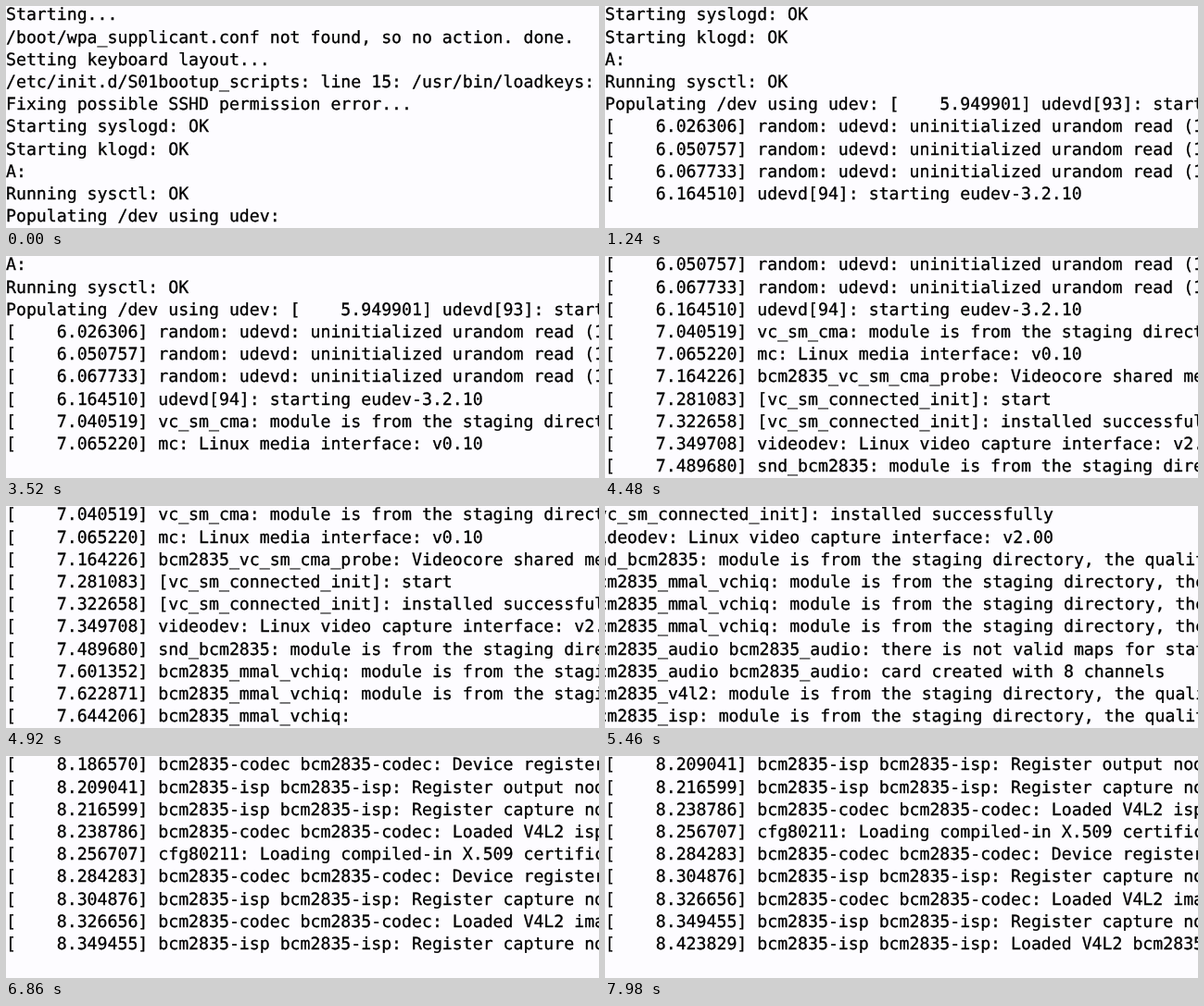
An HTML page that plays this animation: 640x240 px, repeating every 8 s.

```html
<!DOCTYPE html>
<html lang="en">
<head>
<meta charset="utf-8">
<title>Boot console</title>
<style>
  html, body { margin: 0; width: 100%; height: 100%; overflow: hidden; background: #fdfcff; }
  svg { display: block; width: 640px; height: 240px; }
  text {
    font: 18.2px "DejaVu Sans Mono", "Noto Sans Mono", monospace;
    font-variant-ligatures: none;
    text-rendering: geometricPrecision;
    white-space: pre;
    fill: #000;
    stroke: #000;
    stroke-width: 0.3px;
  }
</style>
</head>
<body>
<svg viewBox="0 0 640 240"><g id="screen"></g></svg>
<script>
const LOOP = 8000, ROWS = 10, PITCH = 24.2, BASE = 15.4;
const CHAR = 10.96, VIEW = 649;
const BAUD = 11520; // characters per second of kernel time

const head = `Starting...
/boot/wpa_supplicant.conf not found, so no action. done.
Setting keyboard layout...
/etc/init.d/S01bootup_scripts: line 15: /usr/bin/loadkeys: No such file or directory
Fixing possible SSHD permission error...
Starting syslogd: OK
Starting klogd: OK
A:
Running sysctl: OK
Populating /dev using udev: `;

const urandom = 'random: udevd: uninitialized urandom read (16 bytes read)';
const staging = name => name +
  ': module is from the staging directory, the quality is unknown, you have been warned.';
const isp = text => 'bcm2835-isp bcm2835-isp: ' + text;
const codec = text => 'bcm2835-codec bcm2835-codec: ' + text;
const audio = text => 'bcm2835_audio bcm2835_audio: ' + text;
const ispNode = (node, n) => isp(`Device node ${node} registered as /dev/video${n}`);
const ispMedia = node => isp(`Register ${node} with media controller`);
const codecNode = n => codec('Device registered as /dev/video' + n);
const loaded = name => codec('Loaded V4L2 ' + name);

const log = [
  [5.949901, 'udevd[93]: starting version 3.2.10'],
  [6.026306, urandom],
  [6.050757, urandom],
  [6.067733, urandom],
  [6.164510, 'udevd[94]: starting eudev-3.2.10'],
  [7.040519, staging('vc_sm_cma')],
  [7.065220, 'mc: Linux media interface: v0.10'],
  [7.164226, 'bcm2835_vc_sm_cma_probe: Videocore shared memory driver'],
  [7.281083, '[vc_sm_connected_init]: start'],
  [7.322658, '[vc_sm_connected_init]: installed successfully'],
  [7.349708, 'videodev: Linux video capture interface: v2.00'],
  [7.489680, staging('snd_bcm2835')],
  [7.601352, staging('bcm2835_mmal_vchiq')],
  [7.622871, staging('bcm2835_mmal_vchiq')],
  [7.644206, staging('bcm2835_mmal_vchiq')],
  [7.701438, audio('there is not valid maps for state default')],
  [7.715662, audio('card created with 8 channels')],
  [7.795495, staging('bcm2835_v4l2')],
  [7.808124, staging('bcm2835_isp')],
  [7.830709, staging('bcm2835_codec')],
  [7.939813, ispNode('output[0]', 13)],
  [7.958941, codecNode(10)],
  [7.965928, loaded('decode')],
  [8.047888, ispNode('capture[0]', 14)],
  [8.090179, ispNode('capture[1]', 15)],
  [8.098359, codecNode(11)],
  [8.105322, ispNode('capture[2]', 16)],
  [8.142316, loaded('encode')],
  [8.186570, codecNode(12)],
  [8.209041, ispMedia('output node 0')],
  [8.216599, ispMedia('capture node 1')],
  [8.238786, loaded('isp')],
  [8.256707, 'cfg80211: Loading compiled-in X.509 certificates for regulatory database'],
  [8.284283, codecNode(18)],
  [8.304876, ispMedia('capture node 2')],
  [8.326656, loaded('image_fx')],
  [8.349455, ispMedia('capture node 3')],
  [8.423829, isp('Loaded V4L2 bcm2835-isp')]
].map(([stamp, text]) => ({ stamp, text: `[    ${stamp.toFixed(6)}] ${text}\n` }));

// The screen refreshes in threes: two quick steps, then a longer hold.
function stepAt(ms) {
  const u = ms + 20;
  return Math.floor(u / 140) * 3 + Math.min(2, Math.floor(u % 140 / 20));
}

// Kernel seconds by refresh step, linear between these points.
const clock = [[0, 5.797345], [97, 7.494845], [118, 7.814765], [132, 8.106754], [180, 8.946754]];

function kernelTime(step) {
  const i = clock.findIndex(p => p[0] > step);
  const [s0, k0] = clock[i - 1], [s1, k1] = clock[i];
  return k0 + (k1 - k0) * (step - s0) / (s1 - s0);
}

function output(k) {
  return log.reduce((all, { stamp, text }) =>
    all + text.slice(0, Math.max(0, Math.floor((k - stamp) * BAUD))), head);
}

const screen = document.getElementById('screen');
const rows = Array.from({ length: ROWS }, (_, i) => {
  const row = document.createElementNS('http://www.w3.org/2000/svg', 'text');
  row.setAttribute('y', BASE + i * PITCH);
  return screen.appendChild(row);
});

function draw(step) {
  const lines = output(kernelTime(step)).split('\n').slice(-ROWS);
  rows.forEach((row, i) => { row.textContent = lines[i]; });
  // Keep the typing position in view.
  const shift = Math.max(0, lines[ROWS - 1].length * CHAR - VIEW);
  screen.setAttribute('transform', `translate(${-shift} 0)`);
}

let shown = -1;
function tick() {
  const step = stepAt(performance.now() % LOOP);
  if (step !== shown) draw(shown = step);
  requestAnimationFrame(tick);
}
tick();
</script>
</body>
</html>
```
